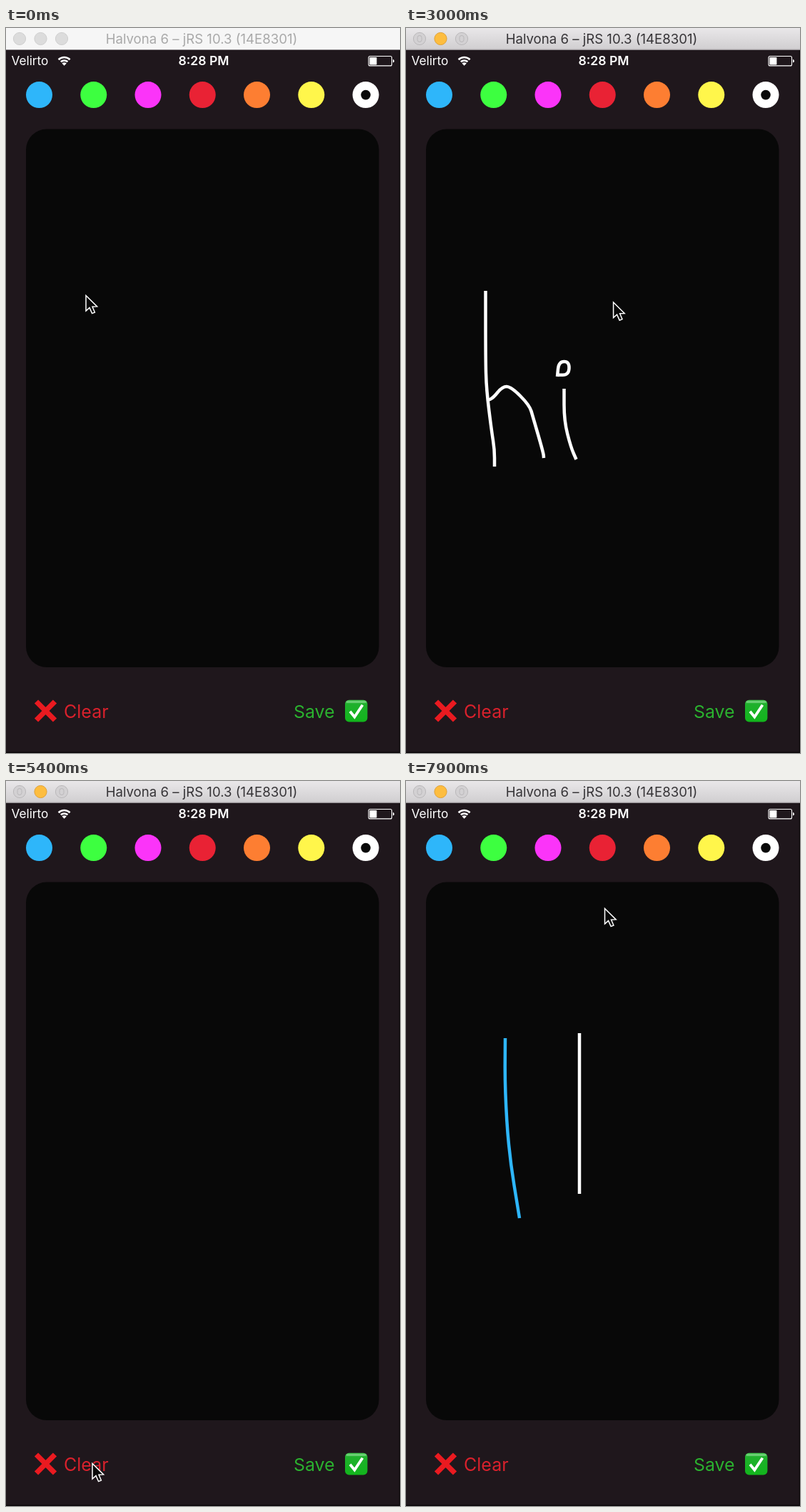
An HTML page for the animation above (8 s loop, 552x1015 px).

```html
<!DOCTYPE html>
<html lang="en">
<head>
<meta charset="utf-8">
<title>Drawing pad</title>
<style>
  html, body { margin: 0; width: 100%; height: 100%; overflow: hidden; background: #1f171c; }
  svg { display: block; width: 552px; height: 1015px; }
  text { font-family: Inter, Roboto, sans-serif; }
</style>
</head>
<body>
<svg viewBox="0 0 552 1015" xmlns="http://www.w3.org/2000/svg">
  <defs>
    <linearGradient id="bar" x2="0" y2="1">
      <stop offset="0" stop-color="#e9e7e9"/><stop offset="1" stop-color="#d0ced0"/>
    </linearGradient>
    <linearGradient id="leaf" x2="0" y2="1">
      <stop offset="0" stop-color="#3fc24a"/><stop offset=".2" stop-color="#1fb02c"/><stop offset="1" stop-color="#12b51c"/>
    </linearGradient>
  </defs>

  <rect width="552" height="1015" fill="#1f171c"/>
  <path d="M551.5 31V1015M0 1014.3H552" stroke="#0a0709" stroke-width="1.4"/>

  <g id="idle">
    <rect width="552" height="30.5" fill="#f6f6f6"/>
    <g fill="#dcdcdc" stroke="#cfcfcf">
      <circle cx="19" cy="15" r="8.6"/><circle cx="48.5" cy="15" r="8.6"/><circle cx="78" cy="15" r="8.6"/>
    </g>
  </g>
  <g id="active">
    <rect width="552" height="30.5" fill="url(#bar)"/>
    <rect y="29.5" width="552" height="1" fill="#b5b2b5"/>
    <g fill="#d3d1d3" stroke="#bab8ba">
      <circle cx="19" cy="15" r="8.6"/><circle cx="78" cy="15" r="8.6"/>
      <rect x="16" y="10.5" width="6" height="9" rx="3"/><rect x="75" y="10.5" width="6" height="9" rx="3"/>
    </g>
    <circle cx="48.5" cy="15" r="8.6" fill="#fdbd3f" stroke="#e0a136"/>
  </g>
  <text id="title" x="274" y="22" font-size="18.6" text-anchor="middle">Halvona 6 – jRS 10.3 (14E8301)</text>

  <g fill="#fff">
    <text x="7.5" y="52.3" font-size="17.2">Velirto</text>
    <text x="277" y="52.3" font-size="17.6" font-weight="600" text-anchor="middle">8:28 PM</text>
    <path d="M73.6 44.2A11.6 11.6 0 0 1 89.6 44.2M76.8 47.3A7.2 7.2 0 0 1 86.4 47.3" fill="none" stroke="#fff" stroke-width="2.6"/>
    <path d="M81.6 52.8L78.4 49.6A4.6 4.6 0 0 1 84.8 49.6Z"/>
    <rect x="508" y="39.5" width="32.5" height="13.4" rx="2" fill="none" stroke="#fff" stroke-width="1.1"/>
    <rect x="509.4" y="40.9" width="10" height="10.6" rx=".8"/>
    <path d="M542 43.8Q544 44.4 544 46.2T542 48.6Z"/>
  </g>

  <g id="dots"></g>
  <circle id="mark" cy="93.6" r="6.8" fill="#080808"/>
  <rect x="28" y="141.5" width="494.5" height="753.5" rx="29" fill="#080808"/>

  <path d="M42.5 943L68.5 969M68.5 943L42.5 969" stroke="#ea1a20" stroke-width="7.4"/>
  <text x="81" y="966" font-size="25" fill="#d9212c">Clear</text>
  <text x="403" y="966" font-size="24.8" fill="#2bb22f">Save</text>
  <rect x="475" y="940.8" width="31.4" height="30.6" rx="5.5" fill="url(#leaf)"/>
  <rect x="476.5" y="942" width="28.4" height="3" rx="1.5" fill="#8edb94" opacity=".6"/>
  <path d="M482 956.8L488.3 964.5L499.5 947.8" fill="none" stroke="#fff" stroke-width="3.8"/>

  <g id="ink" fill="none" stroke-width="4.5" stroke-linejoin="round"></g>
  <path id="arrow" d="M0 .5V22L5 17.6L8.6 25.6L12.4 24L9 16.2L15.6 15.9Z" fill="#080808" stroke="#fff" stroke-width="1.5"/>
</svg>
<script>
const LOOP = 8000, STEP = 100, LAG = 40;
const $ = id => document.getElementById(id);

function add(parent, tag, attrs) {
  const el = document.createElementNS('http://www.w3.org/2000/svg', tag);
  for (const k in attrs) el.setAttribute(k, attrs[k]);
  return parent.appendChild(el);
}

const colors = ['#2eb6fa', '#3dff40', '#fb34f9', '#e92234', '#fd7e32', '#fff64b', '#fff'];
const BLUE = 0, WHITE = 6;
const dotX = i => 46.5 + i * 76.25;
colors.forEach((fill, i) => add($('dots'), 'circle', { cx: dotX(i), cy: 93.6, r: 18.5, fill }));

const clamp = u => Math.max(0, Math.min(1, u));
const smooth = u => u * u * (3 - 2 * u);
const easeOut = u => 1 - (1 - u) ** 3;
const mix = (a, b, u) => a.map((v, i) => v + (b[i] - v) * u);

// What the hand does: one point is a stop or a tap, more points are a pen stroke.
const acts = [
  { from: 0, to: 0, pts: '112,374' },
  { from: 400, to: 900, pts: '111.5,368 111.5,460 112.5,505 120,565 124,590 124,614' },
  { from: 1120, to: 1450, wait: 150, pts: '115,521 122,518 135,502 147,502 173,528 178,545 192.5,595 193,602' },
  { from: 1800, to: 2130, pts: '221.5,505 221.5,550 231,587 238.5,604' },
  { from: 2500, to: 2900, pts: '212,488 214,467 229,467 228,486 210.5,485.6' },
  { from: 3100, to: 3400, pts: '302,369 302,450 307,505 322,557' },
  { from: 3600, to: 4050, pts: '324,600 341,600 340,588 329,588 326,600' },
  { from: 4300, to: 4700, pts: '148,657.5 165,657.5 215,650.5 278,648.5 288,645' },
  { from: 5200, to: 5400, pts: '121,955', wipe: true },
  { from: 5700, to: 5800, pts: '46,95', pick: BLUE },
  { from: 6000, to: 6100, pts: '107.7,343' },
  { from: 6200, to: 6600, pts: '139,360 138.5,430 144,520 159,612' },
  { from: 7000, to: 7100, pts: '510,95', pick: WHITE },
  { from: 7400, to: 7700, pts: '243,353 243,578' },
  { from: 7900, to: LOOP, pts: '278.5,178' }
];

// Smooth line that bends at each inner point and touches the middle of each side.
function curve(pts) {
  let d = `M${pts[0]}L${mix(pts[0], pts[1], .5)}`;
  for (let i = 1; i < pts.length - 1; i++) d += `Q${pts[i]} ${mix(pts[i], pts[i + 1], .5)}`;
  return d + `L${pts[pts.length - 1]}`;
}

let pen = WHITE;
for (const a of acts) {
  a.pts = a.pts.split(' ').map(p => p.split(',').map(Number));
  if (a.pick !== undefined) pen = a.pick;
  if (a.pts.length > 1) {
    a.el = add($('ink'), 'path', { d: curve(a.pts), stroke: colors[pen] });
    a.len = a.el.getTotalLength();
  }
}
const strokes = acts.filter(a => a.el);
const wipe = acts.find(a => a.wipe).to;

const progress = (a, t) => smooth(clamp((t - a.from) / (a.to - a.from)));

function place(a, t) {
  if (!a.el) return a.pts[0];
  const p = a.el.getPointAtLength(progress(a, t) * a.len);
  return [p.x, p.y];
}

function cursorAt(t) {
  const i = acts.findLastIndex(a => a.from <= t);
  const now = acts[i], next = acts[i + 1], leave = now.to + (now.wait || 0);
  if (t <= leave || !next) return place(now, t);
  const u = (t - leave) / (next.from - leave);
  return mix(place(now, now.to), next.pts[0], easeOut(u));
}

function draw(t) {
  const live = t >= 100;
  $('idle').style.display = live ? 'none' : '';
  $('active').style.display = live ? '' : 'none';
  $('title').setAttribute('fill', live ? '#363437' : '#a9a9a9');

  const picked = acts.findLast(a => a.pick !== undefined && a.to <= t);
  $('mark').setAttribute('cx', dotX(picked ? picked.pick : WHITE));

  for (const s of strokes) {
    const p = progress(s, t - LAG);
    const wiped = t >= wipe && s.to < wipe;
    s.el.style.display = p > 0 && !wiped ? '' : 'none';
    s.el.setAttribute('stroke-dasharray', p < 1 ? `${p * s.len} ${s.len + 9}` : 'none');
  }
  $('arrow').setAttribute('transform', `translate(${cursorAt(t)})`);
}

const start = performance.now();
function tick() {
  const t = (performance.now() - start) % LOOP;
  draw(Math.floor(t / STEP) * STEP);
  requestAnimationFrame(tick);
}
tick();
</script>
</body>
</html>
```
